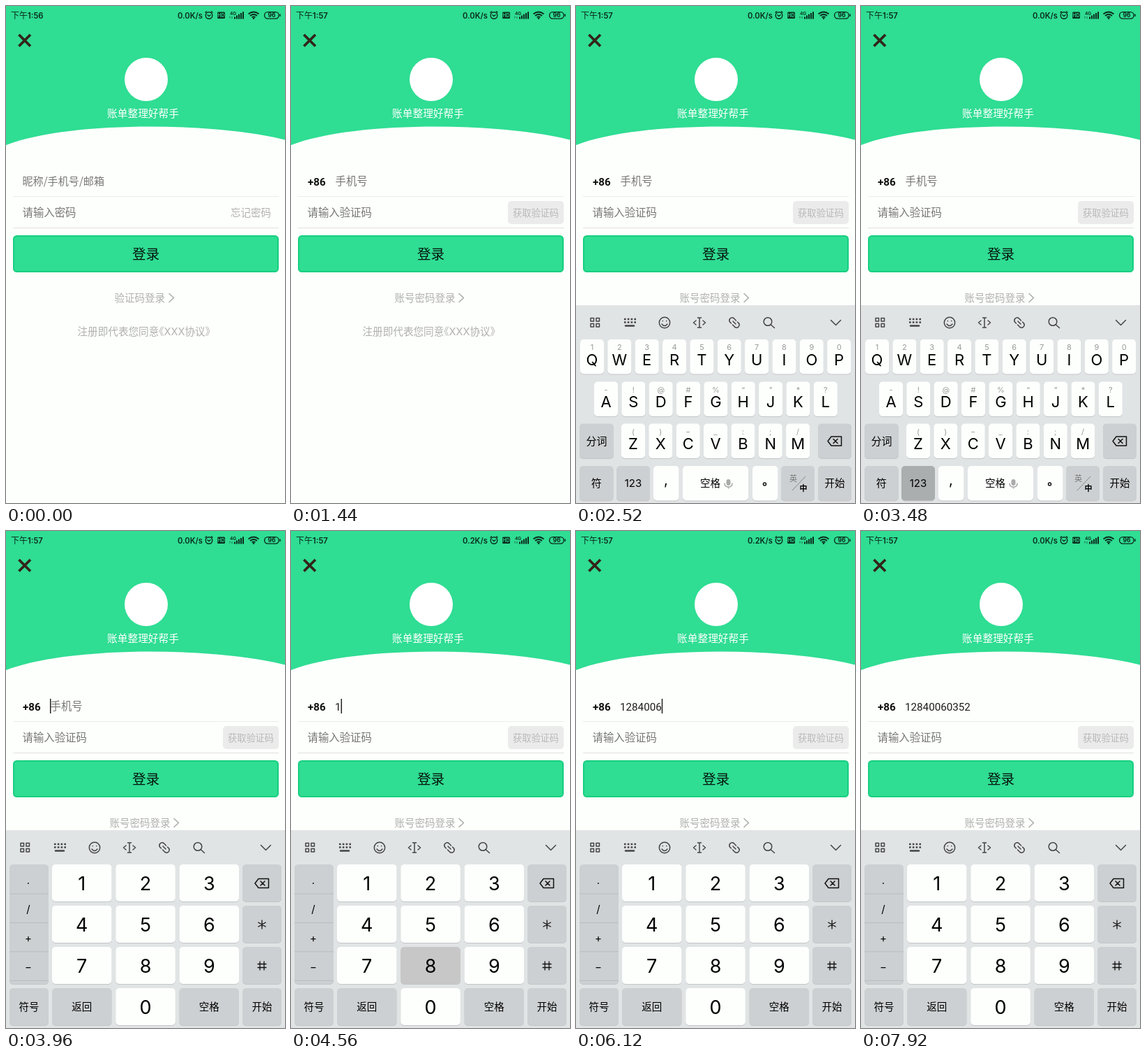
Write an HTML page that moves like this. It is 400 by 711 pixels and loops after 8000 ms.

```html
<!DOCTYPE html>
<html lang="zh-CN">
<head>
<meta charset="utf-8">
<title>登录</title>
<style>
  html, body { margin: 0; width: 100%; height: 100%; overflow: hidden; background: #fdfffc; }
  svg { display: block; width: 100%; height: 100%; }
  text { font-family: "Noto Sans CJK SC", "Noto Sans CJK", "Noto Sans", sans-serif; font-size: 15px; white-space: pre; }
  .latin { font-family: Inter, Roboto, "Noto Sans CJK SC", sans-serif; }
  .num { font-family: Roboto, "Open Sans", sans-serif; font-size: 15.2px; fill: #1c1c1c; }
  .mid { text-anchor: middle; }
  .light { font-weight: 300; }
  .field { font-size: 15.4px; fill: #777; }
  .link { font-size: 14.5px; fill: #b0b0b0; }
  .line { fill: none; stroke: #444; stroke-width: 1.5; stroke-linecap: round; stroke-linejoin: round; }
  .status { fill: #0b2b1d; }
  .status .thin { fill: none; stroke: #0b2b1d; stroke-width: 1.4; }
  .key { fill: #fdfffd; }
  .gray { fill: #cdd0d2; }
  .key.down { fill: #c6c7c6; }
  .gray.down { fill: #abaeae; }
  .hint { font-size: 11px; fill: #999; }
</style>
</head>
<body>
<svg viewBox="0 0 400 711" xmlns="http://www.w3.org/2000/svg">
  <rect width="400" height="711" fill="#fdfffc"/>
  <path d="M0 0H400V191.500C300 166 90 164 0 199Z" fill="#2fdd93"/>

  <g class="status">
    <text x="7" y="18" style="font-size:12px;font-weight:500">下午<tspan id="clock" class="latin" style="font-size:11.3px;font-weight:600"></tspan></text>
    <text id="speed" class="latin" x="246" y="17.500" style="font-size:11.2px;font-weight:600"></text>
    <g class="thin">
      <circle cx="291" cy="13.500" r="4.800"/>
      <path d="M288.500 12.500L291 14.500L293.500 12.500M285.500 9.500L288 7.500M296.500 9.500L294 7.500"/>
      <path d="M347.500 11.500Q355 5.500 362.500 11.500M350 14Q355 10 360 14M352.500 16.300Q355 14.500 357.500 16.300" style="stroke-width:1.7"/>
      <rect x="370.600" y="8.600" width="20.500" height="9.500" rx="4.500"/>
      <path d="M393 11.500V15"/>
      <path d="M328 18.500V15.500M331 18.500V13.500M334 18.500V11.800M337 18.500V10M340 18.500V8.200" style="stroke-width:2"/>
      <path d="M321 17.500V14.500M324 15V18" style="stroke-width:1;opacity:.6"/>
    </g>
    <rect x="303" y="8.500" width="11" height="9.500" rx="1.500"/>
    <text class="latin mid" x="308.500" y="16" style="font-size:7px;font-weight:600;fill:#2fdd93">HD</text>
    <text class="latin" x="321" y="12.500" style="font-size:6.5px;font-weight:600">4G</text>
    <circle cx="355" cy="17.700" r="1.300"/>
    <text class="latin mid" x="381" y="16.400" style="font-size:8.500px;font-weight:700">96</text>
  </g>

  <path d="M18.500 41L35 57.500M35 41L18.500 57.500" fill="none" stroke="#332418" stroke-width="3.800"/>
  <circle cx="201" cy="105" r="31" fill="#fff"/>
  <text class="mid light" x="196.500" y="159" style="font-size:14.7px;fill:#fff">账单整理好帮手</text>

  <path d="M10 272.500H391" stroke="#ebebeb"/>
  <path d="M10 317.500H391" stroke="#e2e2e2"/>
  <g id="byPassword">
    <text class="field" x="23.500" y="256" style="font-size:15.1px">昵称/手机号/邮箱</text>
    <text class="field" x="23.500" y="301">请输入密码</text>
    <text class="link" x="322" y="301">忘记密码</text>
    <text class="link" x="155.500" y="423">验证码登录</text>
    <path class="line" style="stroke:#aaa" d="M234 411.500L240.500 417.500L234 423.500"/>
  </g>
  <g id="byCode">
    <text class="num" x="24" y="256.500" style="font-weight:600;fill:#111">+86</text>
    <text id="placeholder" class="field" x="63.500" y="256">手机号</text>
    <text id="phone" class="num" x="63" y="256.500"></text>
    <rect id="caret" y="240" width="1.500" height="21" fill="#222"/>
    <text class="field" x="23.500" y="301">请输入验证码</text>
    <rect x="311" y="279" width="80" height="33" rx="5" fill="#ebebeb"/>
    <text class="mid" x="351" y="300.500" style="font-size:13.2px;fill:#b9b9b9">获取验证码</text>
    <text class="link" x="148.500" y="423">账号密码登录</text>
    <path class="line" style="stroke:#aaa" d="M241 411.500L247.500 417.500L241 423.500"/>
  </g>
  <rect x="11" y="329" width="379" height="51" rx="4.500" fill="#2fdd93" stroke="#17cf80" stroke-width="2"/>
  <text class="mid light" x="200.500" y="362" style="font-size:19.6px;fill:#07150e">登录</text>
  <text class="link" x="102.500" y="471" style="font-size:14.6px;font-feature-settings:'halt'">注册即代表您同意《<tspan class="latin">XXX</tspan>协议》</text>

  <g id="keyboard">
    <rect y="428" width="400" height="283" fill="#e1e4e5"/>
    <g class="line">
      <path d="M21 446.500h4.500v4.500h-4.500zM29 446.500h4.500v4.500h-4.500zM21 454.500h4.500v4.500h-4.500zM29 454.500h4.500v4.500h-4.500z"/>
      <path d="M69 448H86M69 452.500H86" stroke-width="2.600" stroke-linecap="butt" stroke-dasharray="2.600 2.200"/>
      <path d="M71 457.500H83" stroke-width="2.400"/>
      <circle cx="127" cy="453" r="7.700"/>
      <path d="M123 455Q127 460 131 455M124.300 450.500v.2M129.700 450.500v.2"/>
      <path d="M174.500 446H179.500M177 446V460M174.500 460H179.500M172 450L168.500 453L172 456M182 450L185.500 453L182 456"/>
      <path d="M222.500 454L220.500 452A4 4 0 0 1 226 446.500L229.500 450M231.500 452L233.500 454A4 4 0 0 1 228 459.500L224.500 456M225 451L229 455"/>
      <circle cx="275" cy="451.500" r="5.800"/>
      <path d="M279.500 456L284.500 460.500M365.500 449.500L372.500 456.500L379.500 449.500"/>
    </g>
    <g id="letters"></g>
    <g id="digits"></g>
  </g>
</svg>
<script>
const $ = id => document.getElementById(id);
const LOOP = 8000, STEP = 120;
const SWITCH_FORM = 1080, MINUTE = 1200, FOCUS = 1920, RISE = 2090, RISE_TIME = 405, NUMPAD = 3600;
const phone = "12840060352";
const typedAt = [4440, 4680, 4920, 5160, 5520, 5880, 6000, 6600, 6840, 7080, 7320];

function add(parent, tag, attrs, text = "") {
  const node = document.createElementNS("http://www.w3.org/2000/svg", tag);
  for (const name in attrs) node.setAttribute(name, attrs[name]);
  node.textContent = text;
  parent.append(node);
  return node;
}

function box(parent, x, y, w, h, kind = "key") {
  add(parent, "rect", { x, y: y + 1, width: w, height: h, rx: 5, fill: "#c3c6c8" });
  return add(parent, "rect", { x, y, width: w, height: h, rx: 5, class: kind });
}

function label(parent, x, y, text, size = 15, cls = "") {
  return add(parent, "text", { x, y, class: "latin mid " + cls, style: `font-size:${size}px` }, text);
}

function grayKey(parent, x, y, w, h, text, size = 15) {
  const rect = box(parent, x, y, w, h, "gray");
  if (text) label(parent, x + w / 2, y + h / 2 + 5.5, text, size);
  return rect;
}

function backspace(parent, x, y) {
  add(parent, "path", {
    class: "line", style: "stroke:#111",
    d: `M${x - 10} ${y}l5 -6.500h14.500v13h-14.500zM${x - 2} ${y - 3}l6 6m0 -6l-6 6`
  });
}

function letterRow(x, y, keys, hints) {
  [...keys].forEach((key, i) => {
    const left = x + 39.35 * i;
    box(letters, left, y, 34, 49.5);
    label(letters, left + 17, y + 15, hints[i], 11, "hint");
    label(letters, left + 17, y + 36.5, key, 22);
  });
}

const letters = $("letters"), digits = $("digits");
letterRow(6, 477, "QWERTYUIOP", "1234567890");
letterRow(26, 537.5, "ASDFGHJKL", "-!@#%“”*?");
letterRow(65, 597.5, "ZXCVBNM", "()−_:;/");
grayKey(letters, 5, 597.5, 49, 49.5, "分词");
grayKey(letters, 347, 597.5, 48, 49.5);
backspace(letters, 371, 622.5);
grayKey(letters, 5, 658, 48.5, 49.5, "符");
const modeKey = grayKey(letters, 58, 658, 48, 49.5, "123");
box(letters, 111, 658, 36.5, 49.5);
label(letters, 129, 685, ",", 20);
box(letters, 153, 658, 94, 49.5);
label(letters, 192.5, 688, "空格", 14.5);
add(letters, "rect", { x: 215.5, y: 677, width: 6, height: 9, rx: 3, fill: "#aaa" });
add(letters, "path", { class: "line", style: "stroke:#aaa", d: "M213 683Q213 688 218.500 688T224 683M218.500 688V690" });
box(letters, 253, 658, 36.5, 49.5);
add(letters, "circle", { class: "line", style: "stroke:#111", cx: 270.5, cy: 684, r: 2 });
grayKey(letters, 294, 658, 48, 49.5);
label(letters, 311.5, 680, "英", 11).style.fill = "#777";
add(letters, "path", { class: "line", style: "stroke:#888;stroke-width:1", d: "M310 693L329 673" });
label(letters, 326, 693.5, "中", 11).style.fontWeight = 700;
grayKey(letters, 347, 658, 48, 49.5, "开始", 14.5);

box(digits, 5, 477, 56, 171, "gray");
[".", "/", "+", "−"].forEach((sign, i) => {
  const y = 519 + 41.4 * i;
  label(digits, 32, y - 14, sign, 15);
  add(digits, "path", { d: `M5 ${y}H61`, stroke: "#b9bcbe" });
});
const digitKeys = {};
function digitKey(digit, col, row) {
  const x = 66 + 91.3 * col, y = 477 + 59 * row;
  digitKeys[digit] = box(digits, x, y, 85.5, 53);
  label(digits, x + 42.7, y + 36.5, digit, 27);
}
for (let n = 1; n < 10; n++) digitKey(n, (n - 1) % 3, Math.floor((n - 1) / 3));
digitKey(0, 1, 3);
for (let row = 0; row < 3; row++) grayKey(digits, 339, 477 + 59 * row, 56, 53);
backspace(digits, 367, 504);
const thinLine = { class: "line", style: "stroke:#111;stroke-width:1.3" };
add(digits, "path", { ...thinLine, d: "M367 557V569M361.800 560L372.200 566M372.200 560L361.800 566" });
add(digits, "path", { ...thinLine, d: "M364 616V628M370 616V628M361 619.500H373M361 624.500H373" });
grayKey(digits, 5, 654, 56, 53, "符号", 14.5);
grayKey(digits, 66, 654, 85.5, 53, "返回", 14.5);
grayKey(digits, 248.5, 654, 85.5, 53, "空格", 14.5);
grayKey(digits, 339, 654, 56, 53, "开始", 14.5);

const show = (node, on) => node.style.display = on ? "" : "none";

function draw(t) {
  $("clock").textContent = t < MINUTE ? "1:56" : "1:57";
  $("speed").textContent = t >= 4200 && t < 7440 ? "0.2K/s" : "0.0K/s";
  show($("byPassword"), t < SWITCH_FORM);
  show($("byCode"), t >= SWITCH_FORM);

  const rise = Math.min(1, Math.max(0, (t - RISE) / RISE_TIME));
  $("keyboard").setAttribute("transform", `translate(0 ${283 * (1 - rise) ** 2})`);
  show(letters, t < NUMPAD);
  show(digits, t >= NUMPAD);
  modeKey.classList.toggle("down", t >= NUMPAD - STEP);

  const count = typedAt.filter(at => at <= t).length;
  $("phone").textContent = phone.slice(0, count);
  show($("placeholder"), !count);

  // The second tap lands on the 8 key.
  const pressed = typedAt[count] - t <= STEP ? (count === 1 ? "8" : phone[count]) : null;
  for (const digit in digitKeys) digitKeys[digit].classList.toggle("down", digit === pressed);

  const lastEdit = count ? typedAt[count - 1] : FOCUS;
  show($("caret"), t >= FOCUS && (t - lastEdit) % 1000 < 500);
  $("caret").setAttribute("x", 63 + (count ? $("phone").getComputedTextLength() : 0));
}

const start = performance.now();
function tick() {
  const t = (performance.now() - start) % LOOP;
  draw(Math.floor(t / STEP) * STEP);
  requestAnimationFrame(tick);
}
tick();
</script>
</body>
</html>
```
